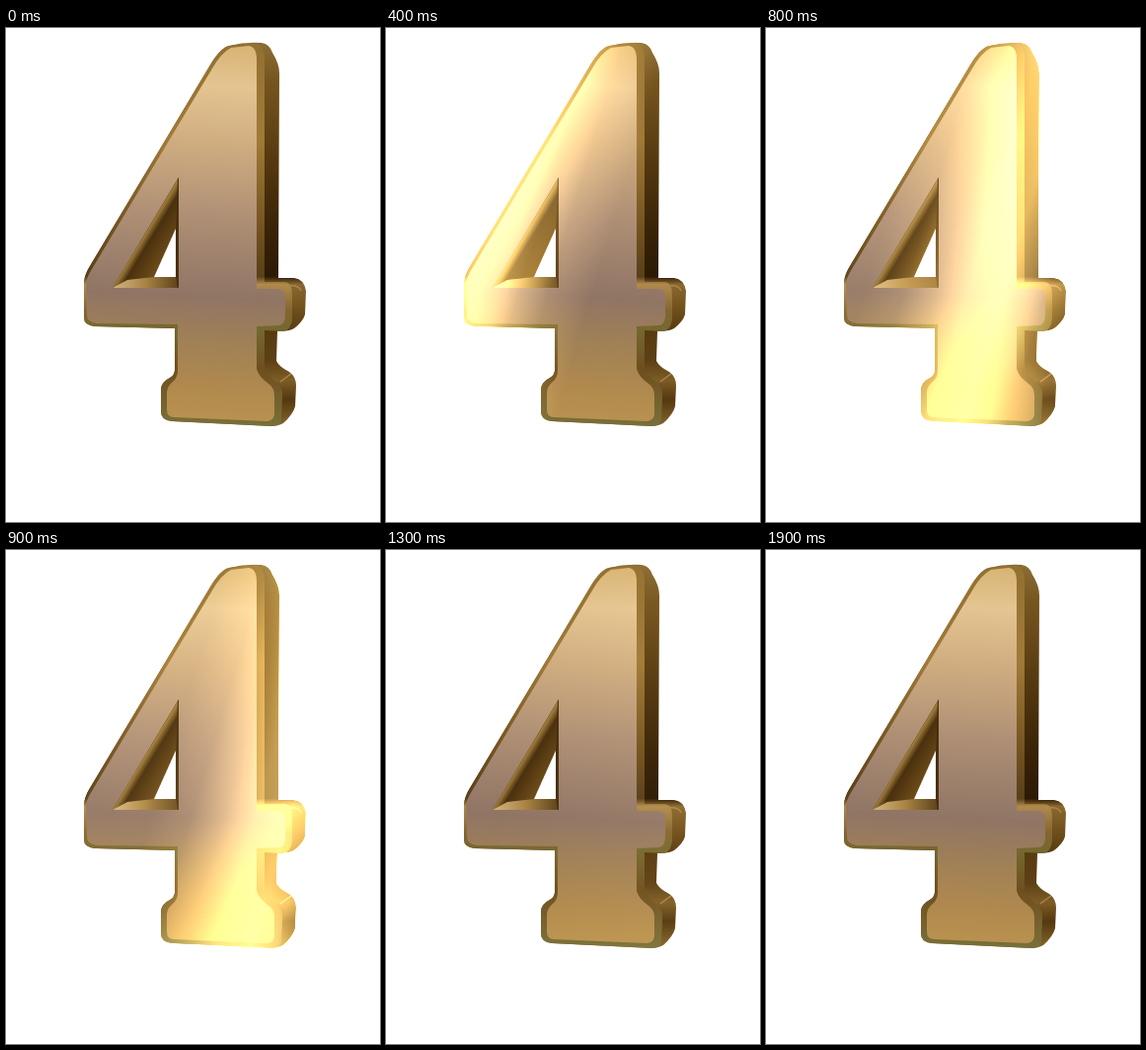
Animation, 379 px wide and 500 px high, one loop 3400 ms. Source, as an HTML page:

```html
<!DOCTYPE html>
<html lang="en">
<head>
<meta charset="utf-8">
<title>Golden four</title>
<style>
  html, body { margin: 0; width: 100%; height: 100%; overflow: hidden; background: #fff; }
  svg { display: block; isolation: isolate; }
  #glint { mix-blend-mode: plus-lighter; }
</style>
</head>
<body>
<svg width="379" height="500" viewBox="0 0 379 500">
  <defs>
    <linearGradient id="side" gradientUnits="userSpaceOnUse" x1="0" y1="15" x2="0" y2="403">
      <stop offset="0" stop-color="#8a6d34"/>
      <stop offset=".1" stop-color="#76551f"/>
      <stop offset=".3" stop-color="#563a10"/>
      <stop offset=".48" stop-color="#3a2407"/>
      <stop offset=".61" stop-color="#2c1a05"/>
      <stop offset=".63" stop-color="#8a6830"/>
      <stop offset=".68" stop-color="#76561f"/>
      <stop offset=".75" stop-color="#573a10"/>
      <stop offset=".83" stop-color="#5d4015"/>
      <stop offset=".88" stop-color="#7d5d26"/>
      <stop offset=".93" stop-color="#543810"/>
      <stop offset="1" stop-color="#84662a"/>
    </linearGradient>
    <linearGradient id="bevel" gradientUnits="userSpaceOnUse" x1="0" y1="15" x2="0" y2="403">
      <stop offset="0" stop-color="#927031"/>
      <stop offset=".25" stop-color="#a17a38"/>
      <stop offset=".5" stop-color="#70501f"/>
      <stop offset=".61" stop-color="#584018"/>
      <stop offset=".63" stop-color="#b08a4c"/>
      <stop offset=".7" stop-color="#83652f"/>
      <stop offset=".75" stop-color="#74682f"/>
      <stop offset=".85" stop-color="#6f4e1e"/>
      <stop offset="1" stop-color="#79703a"/>
    </linearGradient>
    <linearGradient id="face" gradientUnits="userSpaceOnUse" x1="200" y1="20" x2="180" y2="400">
      <stop offset="0" stop-color="#d9b678"/>
      <stop offset=".1" stop-color="#e4c491"/>
      <stop offset=".25" stop-color="#d0ad80"/>
      <stop offset=".45" stop-color="#ae8f75"/>
      <stop offset=".66" stop-color="#907565"/>
      <stop offset=".78" stop-color="#a08056"/>
      <stop offset=".9" stop-color="#b0894e"/>
      <stop offset="1" stop-color="#ba9350"/>
    </linearGradient>
    <linearGradient id="wall" gradientUnits="userSpaceOnUse" x1="141" y1="210" x2="164" y2="224">
      <stop offset="0" stop-color="#9a7838"/>
      <stop offset=".25" stop-color="#4a300e"/>
      <stop offset="1" stop-color="#6a4a18"/>
    </linearGradient>
    <linearGradient id="ledge" gradientUnits="userSpaceOnUse" x1="108" y1="0" x2="174" y2="0">
      <stop offset="0" stop-color="#d5b680"/>
      <stop offset=".5" stop-color="#a98445"/>
      <stop offset="1" stop-color="#5f431a"/>
    </linearGradient>
    <linearGradient id="beam">
      <stop offset="0" stop-color="#000"/>
      <stop offset=".509" stop-color="#0a0906"/>
      <stop offset=".585" stop-color="#1f1b11"/>
      <stop offset=".645" stop-color="#4d4329"/>
      <stop offset=".708" stop-color="#8c7a4b"/>
      <stop offset=".774" stop-color="#a69058"/>
      <stop offset=".821" stop-color="#806f44"/>
      <stop offset=".858" stop-color="#4d4329"/>
      <stop offset=".915" stop-color="#1c180f"/>
      <stop offset="1" stop-color="#000"/>
    </linearGradient>
  </defs>

  <rect width="379" height="500" fill="#fff"/>
  <path fill="url(#side)" d="M79 257Q80 249 85 241L206 39Q217 20 226 18Q242 14 259 15Q267 16 270 25Q277 36 277 46L276 253H292Q302 254 304 266L303 290Q301 297 292 304Q288 307 275 307L274 337Q277 343 287 348Q294 353 294 362L293 383Q291 391 281 400Q276 403 268 403L168 398Q157 397 157 388V365Q158 358 166 354Q171 351 171 346V304L90 302Q79 301 79 293Z"/>
  <path fill="url(#bevel)" d="M79 257Q80 249 85 241L206 39Q217 20 226 18Q242 15 254 16Q262 18 262 32V257H283Q290 258 290 270V294Q289 306 281 307L262 306V344Q266 353 276 360Q281 366 280 375L279 396Q278 403 270 403L168 398Q157 397 157 388V365Q158 358 166 354Q171 351 171 346V304L90 302Q79 301 79 293Z"/>
  <path fill="url(#face)" d="M81 258Q82 252 87 244L209 41Q218 25 228 20L246 18Q254 19 254 32V264H276Q283 265 283 272V292Q282 301 276 301L254 302V345Q256 353 266 360Q272 364 272 372V391Q271 398 264 398L170 394Q163 394 163 386V368Q164 362 169 358Q174 354 174 346V300L92 299Q82 298 82 290Z"/>
  <path fill="#49300f" d="M175 151V263H108Z"/>
  <path fill="url(#wall)" d="M174 153L172 203L150 252L122 256L108 263Z"/>
  <path fill="url(#ledge)" d="M108 263L123 255L150 252H172L174 263Z"/>
  <path fill="#fff" d="M172 203V252H150Z"/>
  <path fill="none" stroke="#a9854a" stroke-width="1.5" d="M286 261Q297 260 299 266M278 358L289 350"/>
  <rect id="glint" x="-420" width="530" height="500" fill="url(#beam)"/>
</svg>
<script>
  const LOOP = 3400, STEP = 100, LAST = 19;
  const glint = document.getElementById('glint');

  function draw(now) {
    const step = Math.min(Math.floor(now % LOOP / STEP), LAST);
    const x = 101 + 11 * step + 2.2 * step * step; // the sweep speeds up
    glint.setAttribute('transform', `translate(${x}) skewX(-16.7)`);
    glint.style.display = step === 0 || step === LAST ? 'none' : '';
    requestAnimationFrame(draw);
  }
  draw(performance.now());
</script>
</body>
</html>
```
